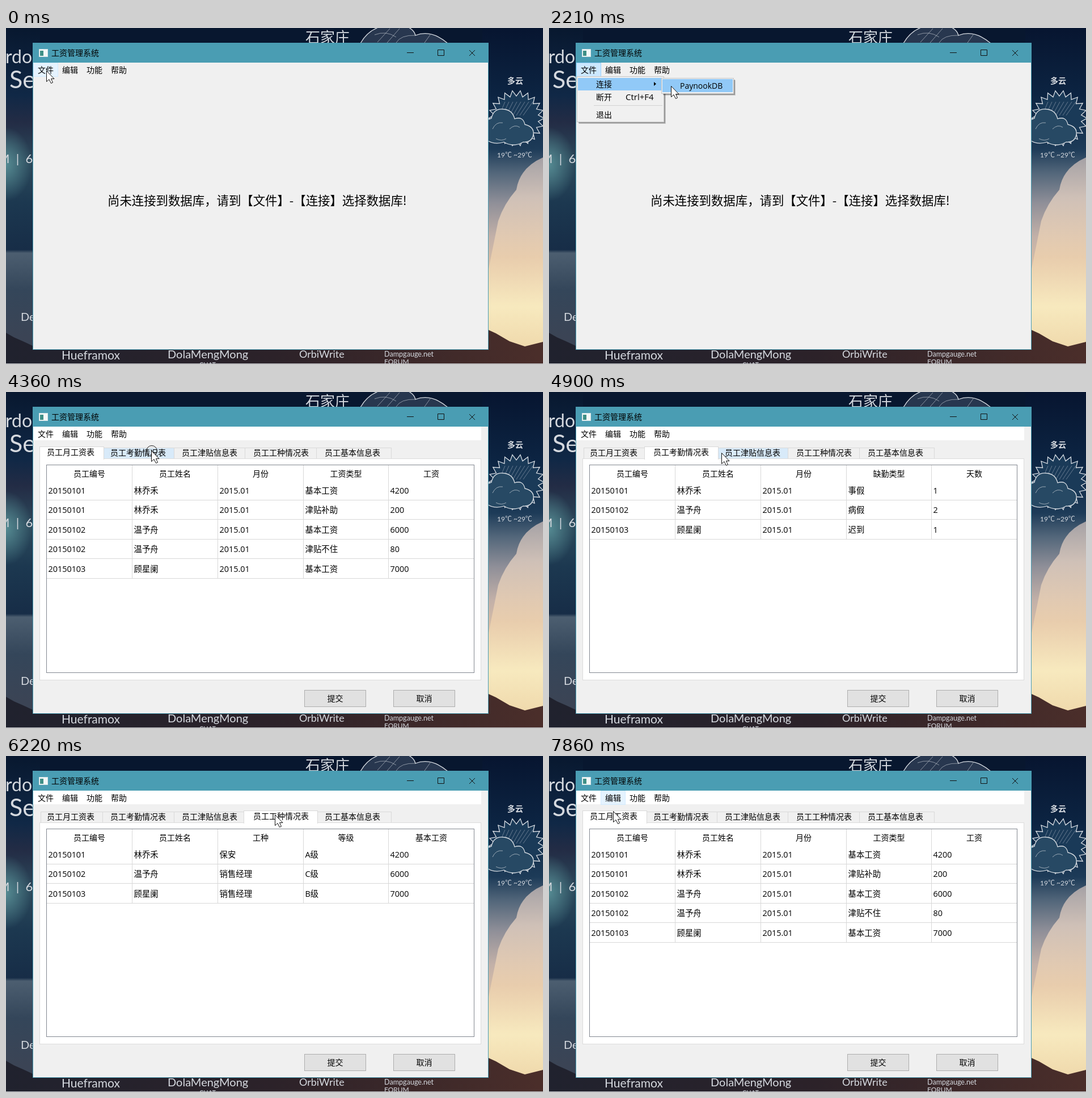
An HTML page that plays this animation: 947x592 px, repeating every 8 s.

```html
<!DOCTYPE html>
<html lang="zh-CN">
<head>
<meta charset="utf-8">
<title>工资管理系统</title>
<style>
html, body { margin: 0; width: 100%; height: 100%; overflow: hidden; background: #0b1a33; }
svg { display: block; width: 947px; height: 592px; }
text { font: 14px 'Open Sans', 'Noto Sans CJK SC', 'Noto Sans CJK', sans-serif; white-space: pre; }
.mid { text-anchor: middle; }
#app .cell { font-size: 14.4px; }
#app .notice { font: 300 21.4px 'Noto Sans CJK SC Light', 'Noto Sans CJK SC', 'Noto Sans CJK', sans-serif; }
#desk text { font-family: Lato, 'Noto Sans CJK SC', 'Noto Sans CJK', sans-serif; fill: #d5d9df; }
#desk .bold { font-weight: 700; }
</style>
</head>
<body>
<svg viewBox="0 0 947 592">
  <defs>
    <linearGradient id="left" x2="0" y2="1">
      <stop offset="0" stop-color="#08182f"/><stop offset=".2" stop-color="#102846"/>
      <stop offset=".28" stop-color="#232c45"/><stop offset=".4" stop-color="#2c4a5c"/>
      <stop offset=".52" stop-color="#1c3850"/><stop offset=".66" stop-color="#172d47"/>
      <stop offset=".67" stop-color="#4c5e70"/><stop offset=".78" stop-color="#34465a"/>
      <stop offset=".92" stop-color="#3b4455"/>
    </linearGradient>
    <radialGradient id="glow">
      <stop offset="0" stop-color="#558a92"/><stop offset="1" stop-color="#558a92" stop-opacity="0"/>
    </radialGradient>
    <linearGradient id="right" x2="0" y2="1">
      <stop offset="0" stop-color="#071530"/><stop offset=".2" stop-color="#0c2442"/>
      <stop offset=".36" stop-color="#1d3b58"/><stop offset=".43" stop-color="#52667a"/>
      <stop offset=".52" stop-color="#8f8f98"/><stop offset=".62" stop-color="#c2b0a8"/>
      <stop offset=".72" stop-color="#dcc0a6"/><stop offset=".82" stop-color="#f3dfb5"/>
      <stop offset=".95" stop-color="#e5c79c"/>
    </linearGradient>
    <linearGradient id="cloud" x2="0" y2="1">
      <stop offset="0" stop-color="#b9b0b0"/><stop offset=".2" stop-color="#dccabd"/>
      <stop offset=".5" stop-color="#ecd0ae"/><stop offset=".75" stop-color="#f8ebc0"/>
      <stop offset="1" stop-color="#f0d9ab"/>
    </linearGradient>
    <linearGradient id="ground">
      <stop offset="0" stop-color="#20222e"/><stop offset=".5" stop-color="#2c2229"/>
      <stop offset="1" stop-color="#4b2e2a"/>
    </linearGradient>
  </defs>
  <g id="desk">
    <rect width="947" height="592" fill="#08172f"/>
    <rect width="60" height="592" fill="url(#left)"/>
    <ellipse cy="240" rx="46" ry="65" fill="url(#glow)"/>
    <rect x="840" width="107" height="592" fill="url(#right)"/>
    <path d="M947 228Q906 246 900 285 878 310 868 340 858 390 850 430V580H947Z" fill="url(#cloud)" opacity=".85"/>
    <path d="M0 537L14 545 30 552 60 566H840V527L864 538 888 552 915 561 947 553V592H0Z" fill="url(#ground)"/>
    <g id="sketch" fill="none" stroke="#d8dde3" stroke-width="1.3">
      <path d="M625 27Q638 4 662 -3H706Q720 3 722 13Q750 2 779 27Z" fill="#28374f"/>
      <path d="M650 12q20-8 38 4M688 26q8-14 34-13M655 25l22-24M672 26l22-25M738 26l10-14" stroke-width=".8" opacity=".7"/>
    </g>
  </g>
  <g id="app"></g>
  <g id="pointer">
    <circle cx="1" cy="1" r="9.5" fill="none" stroke="#222"/>
    <path d="M.5 .5V19.5L5 15.5 8.5 22.5 11.5 21 8.5 14.5H14Z" fill="#fff" stroke="#111"/>
  </g>
</svg>
<script>
const $ = id => document.getElementById(id);
const rect = (x, y, w, h, fill, stroke) => stroke
  ? `<rect x="${x + .5}" y="${y + .5}" width="${w - 1}" height="${h - 1}" fill="${fill}" stroke="${stroke}"/>`
  : `<rect x="${x}" y="${y}" width="${w}" height="${h}" fill="${fill}"/>`;
const text = (x, y, s, cls = '', size = 0) =>
  `<text x="${x}" y="${y}" class="${cls}"${size ? ` style="font-size:${size}px"` : ''}>${s}</text>`;
const line = (d, color, width = 1) => `<path d="${d}" fill="none" stroke="${color}" stroke-width="${width}"/>`;

// Desktop: sun behind a cloud, and the labels around the window
const rays = Array.from({length: 44}, (_, i) => {
  const a = i * Math.PI / 22, r = i % 2 ? 39 : 49;
  return [(900 + r * Math.cos(a)).toFixed(1), (159 + r * Math.sin(a)).toFixed(1)];
});
$('sketch').innerHTML += `<polygon points="${rays.join(' ')}" fill="#1a3a58"/>` +
  Array.from({length: 8}, (_, i) => line(`M${880 + i * 7} 130l-${10 + i} 24`, '#8796a8', .7)).join('') +
  `<path d="M846 196Q838 164 856 159Q860 141 877 143Q893 144 897 160Q912 155 915 170Q932 174 930 188Q927 202 912 201Q895 211 878 201Q860 207 846 196Z" fill="#274964"/>` +
  line('M858 178q6-13 18-11M888 178q9-9 18-3M864 195q10 5 18 0', '#b6c0ca', .8);
$('desk').innerHTML +=
  text(528, 26, '石家庄', '', 26) + text(884, 98, '多云', 'bold', 14) + text(866, 228, '19℃ ~29℃', '', 12) +
  text(-1, 62, 'rdo', '', 32) + text(6, 106, 'Se', '', 43) + text(-14, 238, 'M  |  6', '', 22) +
  text(26, 516, 'De', '', 20) + text(98, 584, 'Hueframox', '', 21) + text(285, 582, 'DolaMengMong', '', 20) +
  text(517, 581, 'OrbiWrite', '', 18) + text(667, 579, 'Dampgauge.net', '', 12.6) +
  text(667, 592, 'FORUM', '', 12) + text(341, 597, 'CHAT', '', 11) + rect(0, 591, 947, 1, '#c4c6ca');

const menus = ['文件', '编辑', '功能', '帮助'];
const tabs = ['员工月工资表', '员工考勤情况表', '员工津贴信息表', '员工工种情况表', '员工基本信息表'];
const tabEdges = [61, 170, 296, 421, 547, 679];
const columns = [71, 222, 373, 524, 674, 825];
const [A, B, C] = ['20150101,林乔禾,', '20150102,温予舟,', '20150103,顾星阑,'];
const tables = [
  ['月份,工资类型,工资', A + '2015.01,基本工资,4200', A + '2015.01,津贴补助,200',
    B + '2015.01,基本工资,6000', B + '2015.01,津贴不住,80', C + '2015.01,基本工资,7000'],
  ['月份,缺勤类型,天数', A + '2015.01,事假,1', B + '2015.01,病假,2', C + '2015.01,迟到,1'],
  ['加班时间,加班天数,津贴', A + '2015.01,5,200', A + '2015.02,5,240', B + '2015.01,2,80'],
  ['工种,等级,基本工资', A + '保安,A级,4200', B + '销售经理,C级,6000', C + '销售经理,B级,7000'],
];

const frame = rect(47, 26, 804, 541, '#f0f0f0', '#4a9db3') + rect(47, 26, 804, 35, '#4a9db3') +
  rect(58, 37, 16, 14, '#f4f8f8', '#d5e4e6') + rect(60, 40, 6, 9, '#3f8f86') +
  text(80, 49, '工资管理系统') +
  line('M707 43.5h12M761.5 38.5h11v10h-11zM817 39l10 10M827 39l-10 10', '#111');

function menuBar({bar, open, tab}) {
  const x = 48 + bar * 43;
  const hot = bar < 0 ? '' : open
    ? rect(x, 61, 44, 25, '#cce8ff', '#99d1ff')
    : rect(x, 61, 44, 25, '#e5f3ff', '#d2ebff');
  return (tab < 0 ? '' : rect(48, 61, 790, 24, '#fff')) + hot +
    menus.map((m, i) => text(56 + i * 43, 79, m)).join('');
}

const panel = (x, y, w, h) => rect(x + 4, y + 4, w - 1, h - 1, '#0002') + rect(x + 3, y + 3, w - 1, h - 1, '#0004') +
  rect(x, y, w, h, '#f0f0f0', '#c6c6c6');

function fileMenu({row, sub}) {
  let s = panel(49, 85, 154, 81) + (row ? rect(51, 88, 149, 22, '#91c9f7') : '') +
    text(83, 104, '连接') + '<path d="M185 95l4 3.5-4 3.5z"/>' +
    text(83, 127, '断开') + text(135, 127, 'Ctrl+F4', '', 15) +
    line('M79 136.5h121', '#d2d2d2') + text(83, 158, '退出');
  if (sub) s += panel(198, 88, 128, 28) + (sub > 1 ? rect(200, 90, 124, 23, '#91c9f7') : '') +
    text(231, 107, 'PaynookDB');
  return s;
}

function tabBar({tab, hover}) {
  const one = i => {
    const on = i == tab, x = tabEdges[i] - 2 * on, end = tabEdges[i + 1] + 1 + 2 * on;
    const fill = on ? '#fff' : i == hover ? '#d8eaf9' : '#f0f0f0';
    return rect(x, on ? 96 : 98, end - x, on ? 23 : 20, fill, '#d9d9d9') +
      (on ? rect(x + 1, 117, end - x - 2, 3, '#fff') : '') +
      text([72, 184, 310, 436, 562][i], on ? 111 : 112, tabs[i]);
  };
  const others = tabs.map((_, i) => i == tab ? '' : one(i)).join('');
  return others + rect(59, 117, 779, 391, '#fff', '#dcdcdc') + one(tab);
}

function grid({tab}) {
  const [head, ...rows] = tables[tab];
  const bottom = 156 + rows.length * 34.5;
  let s = rect(71, 128, 755, 367, '#fff', '#828790');
  columns.slice(1, -1).forEach(x => s += line(`M${x}.5 129V${Math.round(bottom)}`, '#d8d8d8'));
  ('员工编号,员工姓名,' + head).split(',').forEach((h, i) =>
    s += text((columns[i] + columns[i + 1]) / 2 + .5, 149, h, 'mid'));
  rows.forEach((r, j) => {
    s += line(`M72 ${Math.floor(190 + j * 34.5) + .5}H825`, '#d8d8d8');
    r.split(',').forEach((v, i) => s += text(columns[i] + 3.5, Math.floor(179.3 + j * 34.5), v, 'cell'));
  });
  return s;
}

const button = (x, label) => rect(x, 525, 109, 30, '#e1e1e1', '#adadad') + text(x + 54.5, 545, label, 'mid');

function draw(s) {
  $('app').innerHTML = frame + menuBar(s) + (s.tab < 0
    ? text(179, 312, '尚未连接到数据库，请到【文件】-【连接】选择数据库!', 'notice')
    : tabBar(s) + grid(s) + button(526, '提交') + button(683, '取消')) +
    (s.open ? fileMenu(s) : '');
  $('pointer').setAttribute('transform', `translate(${s.x} ${s.y})`);
  $('pointer').firstElementChild.style.display = s.press ? '' : 'none';
}

// Each step: time, pointer x, pointer y, what else changes
let last = {bar: 0, open: 0, row: 0, sub: 0, tab: -1, hover: -1, press: 0};
const steps = [
  [0, 71, 75], [560, 71, 75, {open: 1, press: 1}], [680, 71, 75, {press: 0}],
  [1120, 74, 78], [1260, 81, 83], [1390, 88, 88],
  [1540, 94, 95, {row: 1}], [1660, 101, 101], [1810, 106, 101], [1930, 112, 101],
  [2060, 116, 101, {sub: 1}], [2210, 215, 102, {sub: 2}], [2330, 239, 102],
  [2480, 247, 103], [2600, 252, 103], [2750, 256, 103, {press: 1}],
  [2870, 256, 103, {open: 0, bar: -1, tab: 0}], [2990, 256, 103, {press: 0}],
  [3140, 256, 103, {hover: 1}], [4360, 256, 103, {press: 1}],
  [4510, 256, 103, {tab: 1, hover: -1}], [4630, 256, 103, {press: 0}], [4750, 274, 106],
  [4900, 304, 107, {hover: 2}], [5020, 333, 104], [5170, 344, 103],
  [5320, 347, 104, {press: 1}], [5450, 347, 104, {tab: 2, hover: -1}], [5570, 347, 104, {press: 0}],
  [5710, 362, 104], [5830, 410, 104], [5950, 455, 104, {hover: 3}],
  [6070, 474, 104, {press: 1}], [6220, 474, 103, {tab: 3, hover: -1, press: 0}],
  [6500, 475, 105], [6650, 470, 107], [6800, 410, 105, {hover: 2}], [6920, 325, 101],
  [7070, 215, 88, {hover: -1}], [7220, 165, 80, {bar: 2}], [7340, 127, 78, {bar: 1}],
  [7460, 113, 89], [7610, 113, 97, {press: 1}], [7740, 113, 97, {tab: 0}], [7860, 113, 97, {press: 0}],
].map(([at, x, y, change]) => last = {...last, ...change, at, x, y});

let shown;
function tick() {
  const t = performance.now() % 8000;
  const now = steps.findLast(s => s.at <= t);
  if (now != shown) draw(shown = now);
  requestAnimationFrame(tick);
}
tick();
</script>
</body>
</html>
```
